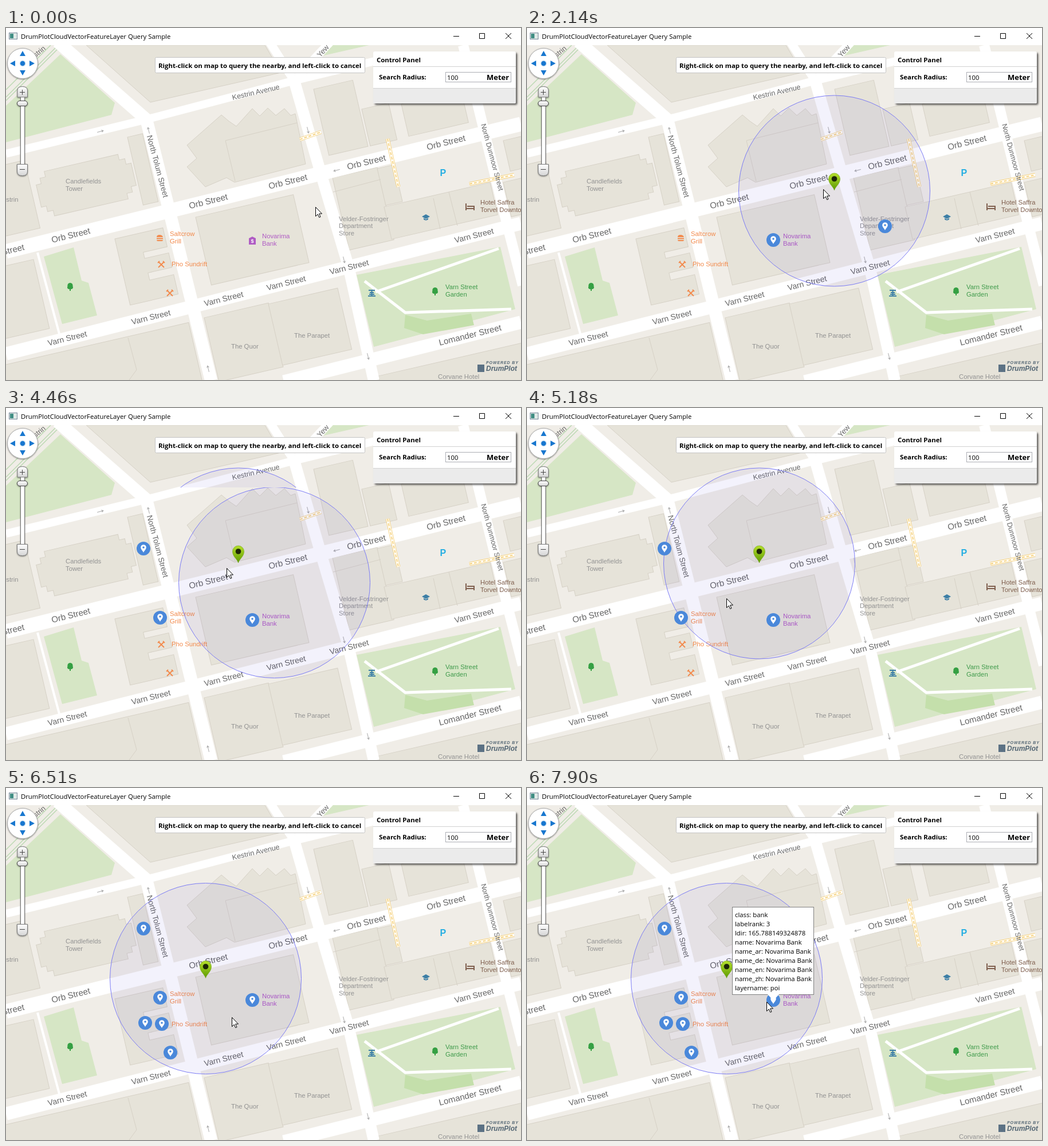
Animation of 899 by 616 pixels, one loop 8000 ms. Source, as an HTML page:

```html
<!DOCTYPE html>
<html lang="en">
<head>
<meta charset="utf-8">
<title>Map query</title>
<style>
html, body { margin: 0; width: 100%; height: 100%; overflow: hidden; background: #fff; }
svg { display: block; width: 100%; height: 100%; }
text { white-space: pre; }
.map { font-family: "Liberation Sans", Arial, sans-serif; }
.ui { font: 11.3px "Open Sans", "Noto Sans", sans-serif; fill: #000; }
.bold { font-weight: 700; font-size: 11.4px; }
.unit { font-size: 13px; }
.building { fill: #e6e3d9; stroke: #d6d1c6; }
.wall { fill: none; stroke: #d6d1c6; }
.road { fill: none; stroke: #fff; stroke-linejoin: round; }
.park { fill: #d6e6c5; }
</style>
</head>
<body>
<svg viewBox="0 0 899 616" preserveAspectRatio="none">
<defs>
  <linearGradient id="pinFill" x2="0" y2="1"><stop stop-color="#b5df2c"/><stop offset="1" stop-color="#5c9a00"/></linearGradient>
  <linearGradient id="knob" x2="0" y2="1"><stop stop-color="#fff"/><stop offset="1" stop-color="#d5d5d5"/></linearGradient>
  <filter id="shadow" x="-20%" y="-20%" width="150%" height="150%"><feDropShadow dx="2.5" dy="2.5" stdDeviation="1.5" flood-opacity=".6"/></filter>
  <filter id="glow" x="-20%" y="-20%" width="140%" height="140%"><feDropShadow dx="0" dy="1" stdDeviation="1" flood-opacity=".45"/></filter>
  <clipPath id="upperTiles"><path d="M0 30H899V139H0Z"/></clipPath>
  <clipPath id="lowerTiles"><path d="M0 139H899V616H0Z"/></clipPath>
  <g id="marker"><circle r="12" fill="#4a88da"/><path d="M0 7C-2 3-4.800 1-4.800-2A4.800 4.800 0 0 1 4.800-2C4.800 1 2 3 0 7Z" fill="#fff"/><circle cy="-2" r="1.800" fill="#4a88da"/></g>
  <path id="arrow" d="M-6 0H5M2-2L5 0L2 2" fill="none" stroke="#aaa"/>
  <path id="tree" d="M0-7C4-7 5-3 4.500-1C6 2 4 4 1 4V7H-1V4C-4 4-6 2-4.500-1C-5-3-4-7 0-7Z" fill="#35a043"/>
  <path id="cutlery" d="M-5-5L5 5M5-5L-5 5M-6-3L-3-6M3-6L6-3" stroke="#f28a4c" stroke-width="1.800"/>
  <path id="crossings" d="M513 195L550 182M666 194L685 278M809 273L887 257"/>
</defs>

<rect width="899" height="616" fill="#f0ede7"/>
<g class="park">
  <path d="M95 46L190 131L184 152L0 200V136Z"/>
  <path d="M568 30H634L538 52Z"/>
  <path d="M66 400L118 384L132 442L144 446L159 503L98 518Z"/>
  <path d="M612 432L863 383L889 492L642 558Z"/>
</g>
<path d="M697 502L735 512L812 500L817 520L728 536L695 525Z" fill="#c4dfab"/>
<path d="M0 108L78 30M0 121L91 30M0 127L97 30" fill="none" stroke="#bcdab3" stroke-width="1.500"/>

<g id="buildings" class="building">
  <path d="M140 30L252 130L480 78L452 30Z"/>
  <path d="M316 205L376 152l13 11 13 9 28-31 13 13 14-14 14 13 15-12 11 12 8-3 18 88-124 32-14-8-37 16-32-35 17-15z"/>
  <path transform="translate(140 275)rotate(-13)" d="M-66-40h132v10h10v10h9v40h-9v10h-10v10h-132v-10h-10v-10h-9v-40h9v-10h10z"/>
  <path transform="translate(190 369)rotate(-13)" d="M0 0H86V34H43V45H86V71H43V84H86V119H0Z"/>
</g>
<path class="wall" d="M400 268L383 197L508 166M213 542L228 598L215 616M571 287L654 265M746 298L758 352M773 287L788 346"/>

<g class="road">
  <path d="M55 393L93 535" stroke-width="4"/>
  <path d="M626 443L697 498L882 492M645 462L860 386" stroke-width="5"/>
  <path d="M0 220L245 160L503 92L660 54" stroke-width="14"/>
  <path d="M461 26L503 92L570 20" stroke-width="15"/>
  <path d="M90 24L245 160L288 332L358 617" stroke-width="22"/>
  <path d="M503 92L548 249L598 418L642 617" stroke-width="20"/>
  <path d="M798 30L875 345L902 450" stroke-width="18"/>
  <path d="M0 391L899 168" stroke-width="25"/>
  <path d="M0 570L899 342M485 619L899 515" stroke-width="23"/>
</g>
<use href="#crossings" stroke="#f6d078" stroke-width="6.500"/>
<use href="#crossings" stroke="#fff" stroke-width="4.700"/>
<use href="#crossings" stroke="#f6d078" stroke-width="1.800" stroke-dasharray="5 3"/>
<use href="#arrow" transform="translate(165 181)rotate(-14)"/>
<use href="#arrow" transform="translate(249 179)rotate(256)"/>
<use href="#arrow" transform="translate(527 179)rotate(76)"/>
<use href="#arrow" transform="translate(577 249)rotate(166)"/>
<use href="#arrow" transform="translate(590 406)rotate(76)"/>
<use href="#arrow" transform="translate(632 575)rotate(76)"/>
<use href="#arrow" transform="translate(353 596)rotate(256)"/>
<use href="#tree" x="112" y="453"/>
<use href="#tree" x="749" y="461"/>
<use href="#cutlery" x="271" y="414"/>
<use href="#cutlery" x="286" y="464"/>
<path d="M263 366Q263 362 268 362T274 366ZM263 367.500H274V369.500H263ZM263 371H274Q274 373 272 373H265Q263 373 263 371Z" fill="#f28a4c"/>
<path d="M424 368L430 365L436 368V379H424Z" fill="#b05cc4"/>
<text class="map" x="427.500" y="376" font-size="9" font-weight="700" fill="#fff">$</text>
<path d="M803 307V319M803 316H817V319M805 312H817V316" fill="none" stroke="#80604f" stroke-width="2"/>
<path d="M726 330L733 326L740 330L733 334ZM729 332.500L733 335L737 332.500V335Q733 338 729 335Z" fill="#3d7fa6"/>
<path d="M633 459H644M635 463H642M638.500 459V469M632 469H645M634 466H643" fill="none" stroke="#3d7fa6" stroke-width="2"/>
<g id="labels" class="map"></g>

<rect x="823" y="589" width="12" height="13" fill="#5c7284"/>
<g class="map" fill="#536674" font-weight="700" font-style="italic">
  <text x="838" y="588" font-size="7" letter-spacing=".9">POWERED BY</text>
  <text x="838" y="600" font-size="12">DrumPlot</text>
</g>

<g fill="#321ec8" fill-opacity=".055" stroke="#7c7cf4">
  <g clip-path="url(#upperTiles)"><circle id="upperCircle" r="167"/></g>
  <g clip-path="url(#lowerTiles)"><circle id="lowerCircle" r="167"/></g>
</g>
<g id="markers"></g>
<g id="pin"><path d="M0-1C-2-8-10-12-10-21A10 10 0 0 1 10-21C10-12 2-8 0-1Z" fill="url(#pinFill)" stroke="#6da312" stroke-width=".6"/><circle cy="-21" r="4.800" fill="#1d2606"/></g>

<rect width="899" height="30" fill="#fff"/>
<rect x="5.500" y="8.500" width="14" height="11" fill="#dfe9e6" stroke="#789"/>
<rect x="7" y="10" width="6" height="8" fill="#3f8d83"/>
<text class="ui" x="26" y="19">DrumPlotCloudVectorFeatureLayer Query Sample</text>
<path d="M781 14.500H791M826.500 9.500H835.500V18.500H826.500ZM872 9L882 19M882 9L872 19" fill="none" stroke="#000"/>

<circle cx="29" cy="62" r="26.500" fill="#fff" stroke="#aaa" filter="url(#glow)"/>
<path d="M29 40L34 49H24ZM29 83L34 74H24ZM7 62L16 57V67ZM50 62L41 57V67Z" fill="#1877cf"/>
<circle cx="29" cy="62" r="5" fill="#1877cf" stroke="#d9e8f6" stroke-width="1.500"/>
<g fill="url(#knob)" stroke="#777" filter="url(#glow)">
  <rect x="25.500" y="118" width="7" height="124" fill="#fff"/>
  <path d="M20 121V109Q20 102.500 28.500 102.500T37.500 109V121Z"/>
  <path d="M19.500 238.500H37.500V251Q37.500 258.500 28.500 258.500T19.500 251Z"/>
  <rect x="19.500" y="127.500" width="18" height="9" rx="4.500" stroke="#444"/>
  <path d="M24 112.500H33M28.500 108V117M24 247.500H33" stroke="#444"/>
</g>

<rect x="260.500" y="51.500" width="366" height="27" rx="2" fill="#fff" stroke="#c4c4c4"/>
<text class="ui bold" x="266" y="70">Right-click on map to query the nearby, and left-click to cancel</text>
<rect x="641" y="41" width="249" height="91" rx="3" fill="#fff" filter="url(#shadow)"/>
<path d="M641 106H890V129Q890 132 887 132H644Q641 132 641 129Z" fill="#ebebeb"/>
<path d="M641 67.500H890M641 105.500H890" stroke="#d2d2d2"/>
<rect x="767.500" y="77.500" width="114" height="17" fill="#fff" stroke="#abadb3"/>
<text class="ui bold" x="647" y="60">Control Panel</text>
<text class="ui bold" x="651" y="90">Search Radius:</text>
<text class="ui" x="770" y="91">100</text>
<text class="ui bold unit" x="839" y="91">Meter</text>

<g id="tooltip">
  <rect x="358.500" y="208.500" width="142" height="153" fill="#fff" stroke="#808080"/>
  <path d="M420 361H440L430 372Z" fill="#fff"/>
</g>
<path id="cursor" d="M.5 .5V16.500L4.200 13L6.700 18.500L9 17.500L6.600 12H11.500Z" fill="#fff" stroke="#000"/>
</svg>
<script>
const LOOP = 8000, RADIUS = 168, TICK = 135;
const GREY = '#666', PALE = '#929292', ORANGE = '#f28a4c', PURPLE = '#b05cc4', BROWN = '#80604f', GREEN = '#3f9a4b';
const byId = id => document.getElementById(id);

function add(parent, tag, attributes, text = '') {
  const node = document.createElementNS('http://www.w3.org/2000/svg', tag);
  for (const name in attributes) node.setAttribute(name, attributes[name]);
  node.textContent = text;
  byId(parent).append(node);
  return node;
}

// Plain buildings follow the tilt of the street grid.
function block(x, y, width, height) {
  add('buildings', 'rect', { width, height, transform: `translate(${x} ${y})rotate(-13)` });
}
block(-40, 248, 74, 122);
block(212, 191, 27, 122);
block(331, 331, 175, 122);
block(-30, 423, 80, 124);
block(-30, 596, 358, 120);
block(346, 507, 115, 115);
block(458, 483, 124, 110);
block(570, 262, 80, 130);
block(648, 246, 30, 66);
block(660, 313, 190, 58);
block(537, 107, 70, 119);
block(621, 142, 48, 66);
block(690, 133, 107, 58);
block(868, 197, 50, 55);
block(868, 270, 50, 62);
block(650, 609, 270, 80);

function street(text, x, y, angle, size) {
  add('labels', 'text', {
    transform: `translate(${x} ${y})rotate(${angle})`, y: size * 0.36,
    'text-anchor': 'middle', 'font-size': size, fill: GREY
  }, text);
}
function place(lines, x, y, fill) {
  lines.split('|').forEach((line, i) =>
    add('labels', 'text', { x, y: y + i * 12.7, 'font-size': 11.3, fill }, line));
}

for (const x of [-2, 113, 353, 492, 629, 768]) street('Orb Street', x, 390.5 - 0.248 * x, -14, 15);
for (const x of [107, 253, 380, 489, 599, 817]) street('Varn Street', x, 570 - 0.2535 * x, -14, 14);
street('Kestrin Avenue', 436, 112, -13, 12.6);
street('Kestrin', 52, 46, -40, 12.5);
street('Yew', 553, 40, -48, 13);
street('North Tolum Street', 265, 242, 75, 13.5);
street('North Dunmoor Street', 849, 226, 75, 12.4);
street('Lomander Street', 810, 537, -14, 15);

place('Candlefields|Tower', 104, 272, PALE);
place('estrin', -6, 304, PALE);
place('Velder-Fostringer|Department|Store', 581, 337.5, PALE);
place('The Quor', 393, 561, PALE);
place('The Parapet', 503, 542, PALE);
place('Corvane Hotel', 754, 614, PALE);
place('Saltcrow|Grill', 286, 364, ORANGE);
place('Pho Sundrift', 289, 416.5, ORANGE);
place('Novarima|Bank', 447, 368, PURPLE);
place('Hotel Saffra|Torvel Downto', 828, 309, BROWN);
place('Varn Street|Garden', 767, 457, GREEN);
add('labels', 'text', { x: 757.5, y: 258.5, 'font-size': 16, 'font-weight': 700, fill: '#25aee2' }, 'P');

const bank = 'Novarima Bank';
['class: bank', 'labelrank: 3', 'ldir: 165.788149324878', `name: ${bank}`,
  ...['ar', 'de', 'en', 'zh'].map(code => `name_${code}: ${bank}`), 'layername: poi']
  .forEach((line, i) => add('tooltip', 'text', { class: 'ui', x: 363, y: 226 + 16 * i }, line));

const places = [[430, 371], [625, 347], [240, 246], [269, 367], [243, 411], [272, 413], [287, 463]]
  .map(([x, y]) => ({ x, y, node: add('markers', 'use', { href: '#marker', x, y }) }));

// The pin drops first; the two rows of map tiles repaint at their own times.
const queries = [
  { x: 536.5, y: 285, pin: 1540, upper: 1540, lower: 1700 },
  { x: 468.5, y: 305.5, pin: 3250, upper: 3400, lower: 3530 },
  { x: 405.5, y: 272, pin: 4460, upper: 4460, lower: 4600 },
  { x: 348.5, y: 333.5, pin: 5930, upper: 6080, lower: 6080 }
];

// Cursor strokes: start time, end time, resting point.
const strokes = [
  [0, 0, 540, 313], [560, 830, 536, 285], [2140, 2140, 517, 282], [2280, 2410, 477, 295],
  [2560, 2680, 468, 305], [3530, 3800, 405, 272], [4460, 4600, 365, 287], [5060, 5180, 348, 333],
  [6230, 6660, 409, 423], [6810, 7050, 408, 400], [7200, 7480, 416, 381], [7760, 7900, 418, 374]
];

// The cursor moves in even, visible jumps along each stroke.
function cursorAt(time) {
  const index = strokes.findLastIndex(([start]) => start <= time);
  const [start, end, x, y] = strokes[index];
  const [, , fromX, fromY] = strokes[Math.max(0, index - 1)];
  const jumps = Math.round((end - start) / TICK) + 1;
  const pace = (end - start) / (jumps - 1) || 1;
  const progress = Math.min(1, (Math.floor((time - start + 10) / pace) + 1) / jumps);
  return { x: Math.round(fromX + (x - fromX) * progress), y: Math.round(fromY + (y - fromY) * progress) };
}

function show(node, visible) { node.style.display = visible ? '' : 'none'; }
function moveTo(id, point) {
  show(byId(id), point);
  if (point) byId(id).setAttribute('transform', `translate(${point.x} ${point.y})`);
}

function draw() {
  const time = performance.now() % LOOP;
  const latest = part => queries.findLast(query => query[part] <= time);
  const query = latest('pin');
  moveTo('cursor', cursorAt(time));
  moveTo('pin', query);
  moveTo('upperCircle', latest('upper'));
  moveTo('lowerCircle', latest('lower'));
  for (const { x, y, node } of places)
    show(node, query && Math.hypot(x - query.x, y - query.y) < RADIUS);
  show(byId('tooltip'), time >= 7900);
  requestAnimationFrame(draw);
}
draw();
</script>
</body>
</html>
```
